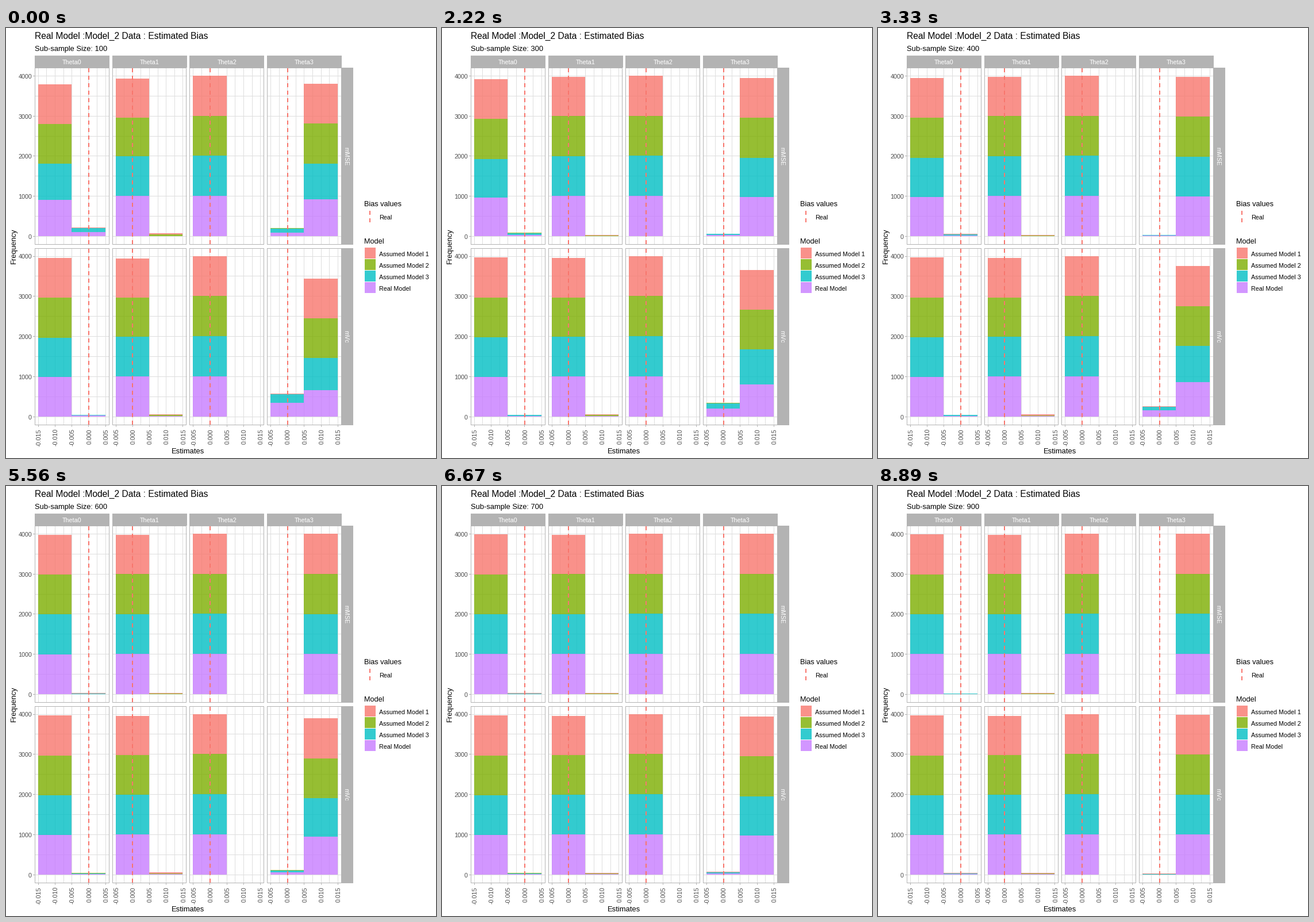
Animation, 748 px wide and 748 px high, one loop 10000 ms. Source, as a matplotlib script:

```python
import matplotlib.pyplot as plt
import numpy as np
from matplotlib.animation import FuncAnimation
from matplotlib.patches import Rectangle

SIZE, DPI = 748, 64
PT = 72 / DPI  # points per pixel
plt.rcParams["font.family"] = "Liberation Sans"

LOOP, TICKS, STATES = 10000, 100, 9
LEFT, STEP, WIDTH = 50.4, 134.75, 128.6
PAD, BIN = 5.85, 58.45
TOPS, HEIGHT = (69.4, 383.1), 307
ZERO, UNIT = 293.1, 0.06978  # baseline offset in a panel, pixels per count
GREY, GRID, RED = "#b3b3b3", "#dedede", "#f8766d"
FILLS = ("#c77cff", "#00bfc4", "#7cae00", RED)  # stacked from the bottom

# Counts outside the main bin: (extra at the start, fading power, lasting part)
FADES = {
    (0, 0): ((92, 98, 0, 0), 3.6, (3, 6, 5, 7)),
    (0, 1): ((0, 0, 33, 14), 12, (0, 2, 7, 18)),
    (0, 2): (0, 1, (0, 0, 0, 0)),
    (0, 3): ((88, 100, 8, 6), 4.5, (0, 0, 0, 0)),
    (1, 0): ((5, 4, 0, 0), 1, (13, 14, 4, 3)),
    (1, 1): ((0, 0, 6, 6), 2, (4, 7, 18, 16)),
    (1, 2): (0, 1, (0, 0, 0, 0)),
    (1, 3): ((338, 202, 0, 8), 1.8, (2, 7, 5, 5)),
}

fig = plt.figure(figsize=(SIZE / DPI, SIZE / DPI), dpi=DPI, facecolor="white")
ax = fig.add_axes([0, 0, 1, 1])
ax.set(xlim=(0, SIZE), ylim=(SIZE, 0))
ax.axis("off")


def text(x, y, s, px, color="black", ha="left", rot=0):
    return ax.text(x, y, s, fontsize=px * PT, color=color, ha=ha, va="baseline",
                   rotation=rot, rotation_mode="anchor", zorder=6)


def rect(x, y, w, h, color, **kw):
    return ax.add_patch(Rectangle((x, y), w, h, fc=color, lw=0, **kw))


def line(xs, ys, color, z=1, lw=1, **kw):
    ax.plot(xs, ys, color=color, lw=lw * PT, zorder=z, **kw)


def dashed(x, bottom, top):
    line([x, x], [bottom, top], RED, z=4, lw=2, dashes=(3.5, 3),
         dash_capstyle="butt")


def draw_panel(row, col):
    """Draw one facet and return its (main, minor) bar stacks."""
    x0, y0 = LEFT + STEP * col, TOPS[row]
    x1, y1 = x0 + WIDTH, y0 + HEIGHT
    start, base = x0 + PAD, y0 + ZERO
    for i in range(9):
        x, y = int(start + i * BIN / 4), int(base - 500 * i * UNIT)
        line([x, x], [y0, y1], GRID)
        line([x0, x1], [y, y], GRID)
    edges = np.floor(start + BIN * np.arange(3))
    stacks = [[rect(edges[k], base, edges[k + 1] - edges[k], 0, c, alpha=0.8,
                    zorder=3) for c in FILLS] for k in (0, 1)]
    zero = start + BIN * (1.5 if col == 0 else 0.5)
    dashed(round(zero), y1, y0)
    l, r, t, b = int(x0), int(x1), int(y0), int(y1)
    line([l, r, r, l, l], [t, t, b, b, t], GREY, z=5)
    return stacks[::-1] if col == 3 else stacks


bars = {key: draw_panel(*key) for key in FADES}

for col in range(4):
    x0 = LEFT + STEP * col
    rect(int(x0), 48, WIDTH + 1, 21, GREY, zorder=2)
    text(x0 + WIDTH / 2, 63, f"Theta{col}", 10.8, "white", "center")
    first = -0.015 if col == 0 else -0.005
    for i in range(5):
        x = x0 + PAD + i * BIN / 2
        label = f"{first + 0.005 * i + 1e-9:.3f}"
        line([int(x)] * 2, [690, 693], GREY)
        text(x + 4.3, 697, label, 10.8, "#4d4d4d", "right", 90)

for top, name in zip(TOPS, ("mMSE", "mVc")):
    rect(583, int(top), 21, HEIGHT + 1, GREY, zorder=2)
    text(588.3, top + HEIGHT / 2, name, 10.8, "white", "center", 270)
    for n in range(0, 5000, 1000):
        y = top + ZERO - n * UNIT
        line([47, 50], [int(y)] * 2, GREY)
        text(45, y + 4.4, str(n), 10.8, "#4d4d4d", "right")

text(50, 19, "Real Model :Model_2 Data : Estimated Bias", 15.65)
subtitle = text(50, 40, "", 12.9)
text(316.8, 740, "Estimates", 13, ha="center")
text(17.3, 379.6, "Frequency", 13, ha="center", rot=90)

text(623, 310, "Bias values", 12.8)
dashed(633, 338, 318)
text(649, 333, "Real", 10.8)
text(623, 375, "Model", 12.8)
names = ("Assumed Model 1", "Assumed Model 2", "Assumed Model 3", "Real Model")
for i, (name, color) in enumerate(zip(names, FILLS[::-1])):
    y = 382 + 20 * i
    rect(624, y, 19, 19, color, alpha=0.8)
    text(649, y + 14.6, name, 10.8)


def update(tick):
    span = LOOP // TICKS
    state = (span * (tick + 1) - 1) * STATES // LOOP
    subtitle.set_text(f"Sub-sample Size: {100 * (state + 1)}")
    left = 1 - state / (STATES - 1)
    for key, (main, minor) in bars.items():
        extra, power, lasting = FADES[key]
        outside = np.multiply(extra, left ** power) + lasting
        base = TOPS[key[0]] + ZERO
        for stack, counts in ((main, 1000 - outside), (minor, outside)):
            ys = np.floor(base - UNIT * np.append(0, np.cumsum(counts)))
            for bar, bottom, top in zip(stack, ys, ys[1:]):
                bar.set_y(top)
                bar.set_height(bottom - top)


anim = FuncAnimation(fig, update, frames=TICKS, interval=LOOP // TICKS,
                     init_func=lambda: update(0), repeat=True)
plt.show()
```
